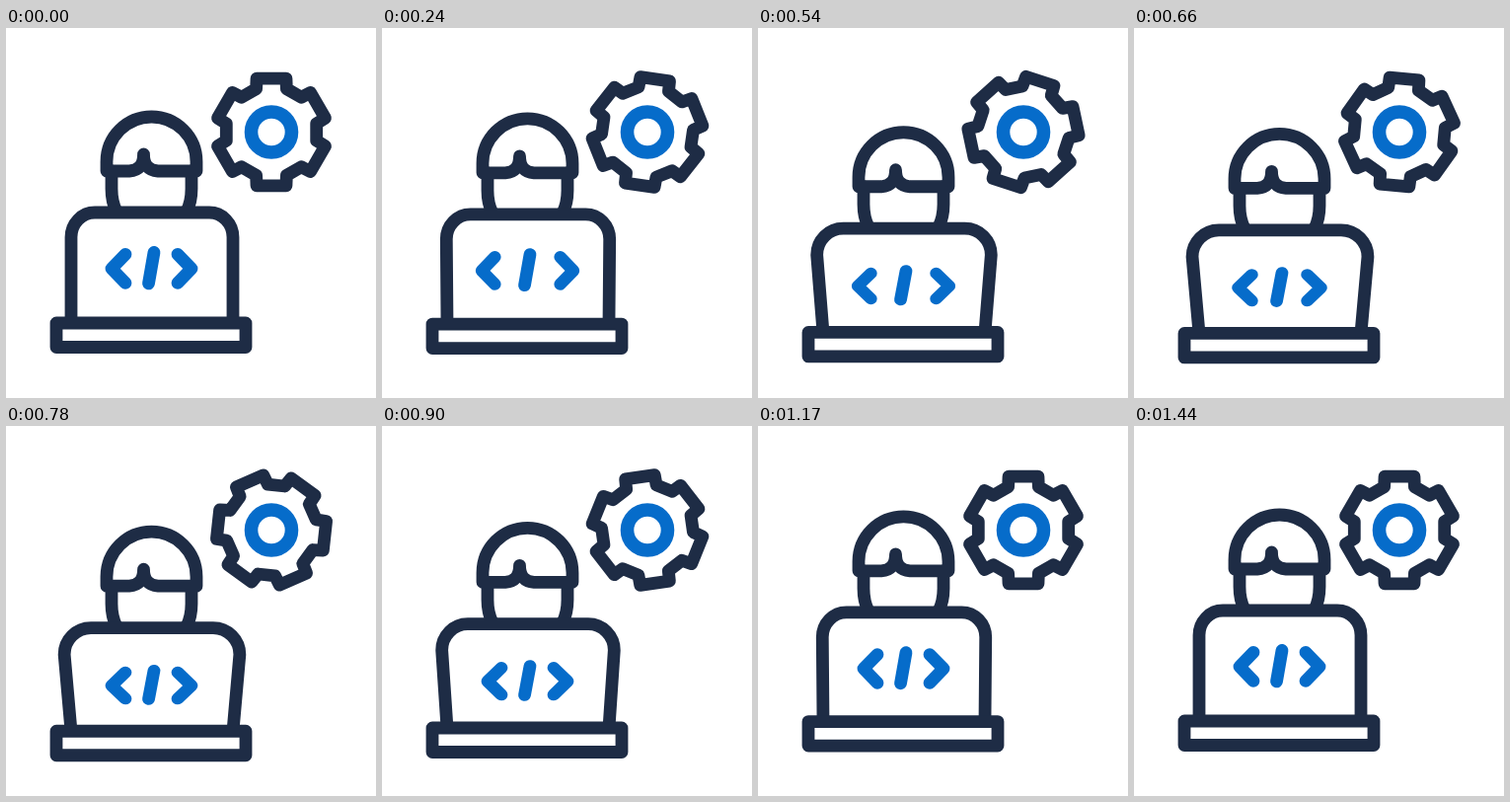
An HTML page that plays this animation: 375x375 px, repeating every 1.5 s.

```html
<!DOCTYPE html>
<html lang="en">
<head>
<meta charset="utf-8">
<title>Developer at work</title>
<style>
  html, body { margin: 0; width: 100%; height: 100%; overflow: hidden; background: #fff; }
  svg { display: block; width: 100vw; height: 100vh; }
  svg * { stroke-linecap: round; stroke-linejoin: round; }
</style>
</head>
<body>
<svg viewBox="0 0 375 375" fill="none" stroke="#1e2c45" stroke-width="12.8">
  <g transform="translate(269 105.5)">
    <path id="gear"/>
    <circle r="20.5" stroke="#066cca" stroke-width="13.6"/>
  </g>
  <g id="head">
    <path d="M107 145V163Q107 176 112 186M188 145V163Q188 176 183 186"/>
    <path d="M102 145V135.5A45.5 45.5 0 0 1 193 135.5V145H154Q139.5 144 139.5 128Q139.5 144 125 145Z"/>
  </g>
  <path id="lid" fill="#fff"/>
  <g id="code" stroke="#066cca">
    <path id="left" d="M7 -14.5L-7 0L7 14.5"/>
    <path id="slash" d="M2.5 -16.5L-3 15"/>
    <path id="right" d="M-7 -14.5L7 0L-7 14.5"/>
  </g>
  <path id="base" d="M51 299H243V323.5H51Z" fill="#fff"/>
</svg>
<script>
const LOOP = 1500;
const $ = id => document.getElementById(id);
const put = (id, transform) => $(id).setAttribute('transform', transform);

// Cubic Bezier easing from (0,0) to (1,1) with handles (x1,0) and (x2,1)
function ease(t, start, end, x1, x2) {
  const p = Math.min(1, Math.max(0, (t - start) / (end - start)));
  let lo = 0, hi = 1;
  for (let i = 0; i < 24; i++) {
    const u = (lo + hi) / 2, v = 1 - u;
    if (3 * x1 * u * v * v + 3 * x2 * u * u * v + u ** 3 < p) lo = u; else hi = u;
  }
  return lo * lo * (3 - 2 * lo);
}

function gearPath(teeth = 6) {
  const points = [];
  for (let i = 0; i < teeth; i++) {
    for (const [r, a] of [[46.5, -19.3], [56.3, -15.4], [56.3, 15.4], [46.5, 19.3]]) {
      const angle = (i * 360 / teeth + a) * Math.PI / 180;
      points.push(`${r * Math.sin(angle)} ${-r * Math.cos(angle)}`);
    }
  }
  return `M${points.join('L')}Z`;
}

// lean: 0 = upright, 1 = leaning towards the viewer
function lidPath(lean, drop) {
  const top = 187 + 18 * lean, side = 212 + 20 * lean, bottom = 299 + drop;
  const dx = 7 * lean, corner = 4 * lean;
  const arc = `A${24 + 3 * lean} ${side - top} 0 0 1 `;
  return `M66 ${bottom}L${66 - dx} ${side}${arc}${90 - corner} ${top}` +
    `H${206 + corner}${arc}${230 + dx} ${side}L230 ${bottom}`;
}

function draw(t) {
  const rise = ease(t, 60, 720, .6, .4);
  const lean = rise - ease(t, 720, 1440, .4, .2);
  const drop = 10.5 * (rise - ease(t, 720, 1350, .4, .2));
  const spread = ease(t, 30, 390, 1 / 3, 2 / 3) - ease(t, 390, 750, 1 / 3, 2 / 3);
  const size = 1 - .06 * spread;

  put('gear', `rotate(${180 * ease(t, 30, 1110, .6, .4)})`);
  put('head', `translate(0 ${17.5 * lean})`);
  put('base', `translate(0 ${drop})`);
  $('lid').setAttribute('d', lidPath(lean, drop));
  put('code', `translate(147.5 ${243.9 + 19.5 * lean}) scale(1 ${1 - .08 * lean})`);
  put('left', `translate(${-33.5 - 10 * spread}) scale(${size})`);
  put('right', `translate(${33.5 + 10 * spread}) scale(${size})`);
  $('slash').style.display = t >= 300 && t < 510 ? 'none' : '';
}

$('gear').setAttribute('d', gearPath());
function tick() {
  draw(performance.now() % LOOP);
  requestAnimationFrame(tick);
}
tick();
</script>
</body>
</html>
```
